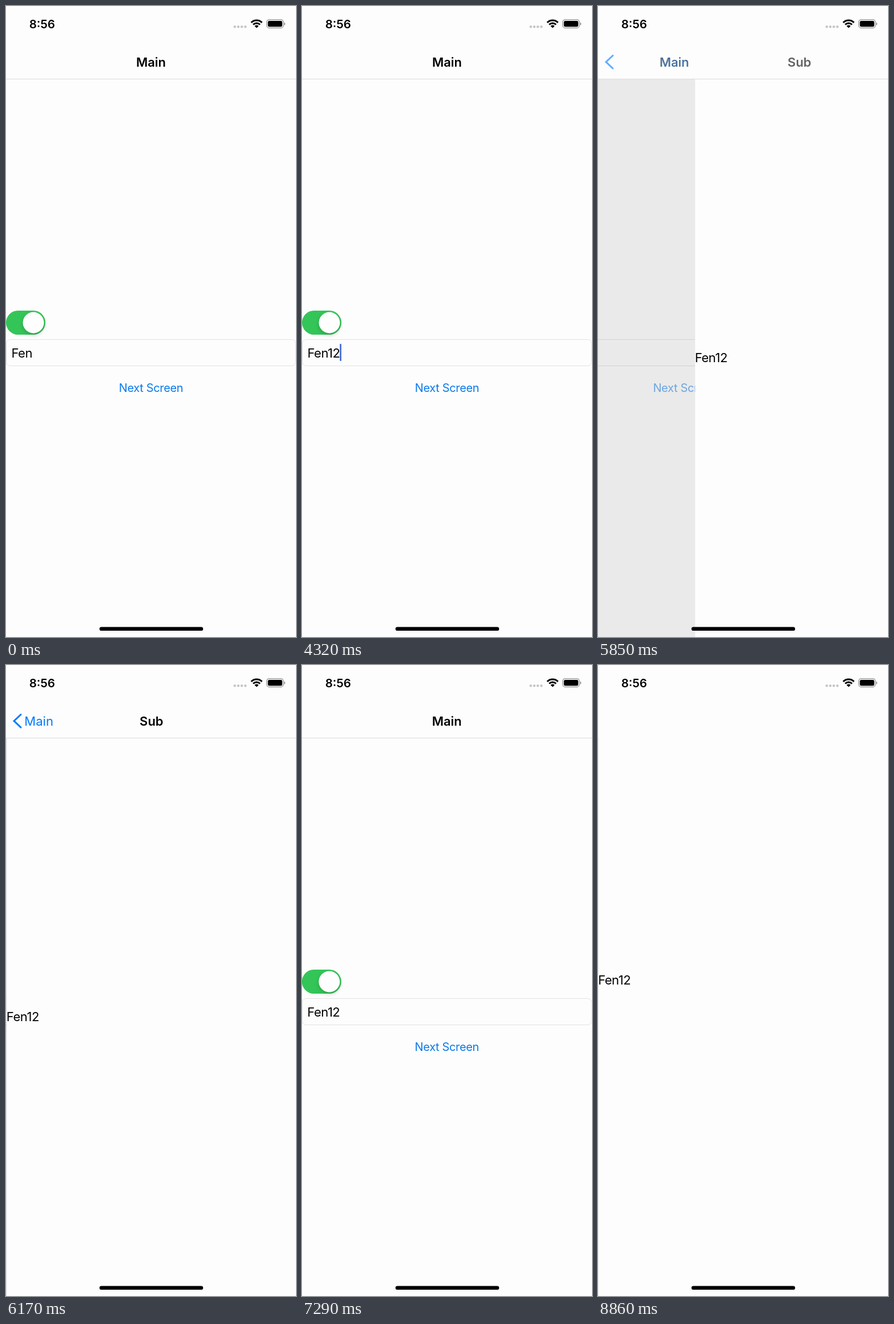
Animation, 508 px wide and 1102 px high, one loop 8.9 s. Source, as an HTML page with a canvas:

```html
<!DOCTYPE html>
<html lang="en">
<head>
<meta charset="utf-8">
<title>Navigation demo</title>
<style>
html, body { margin: 0; width: 100%; height: 100%; overflow: hidden; background: #fdfdfd; }
canvas { display: block; width: 508px; height: 1102px; }
</style>
</head>
<body>
<canvas></canvas>
<script>
const W = 508, H = 1102, LOOP = 8900;
const BG = '#fdfdfd', BLUE = '#007aff', BUTTON = '#0a7aea';
const PUSH = 5726, POP = 6799, PUSH_BARE = 8368;
const DELETES = [1440, 1550, 1670], KEYS = [3250, 3480, 3530, 3710, 3850];

const canvas = document.querySelector('canvas'), c = canvas.getContext('2d');
const dpr = window.devicePixelRatio || 1;
canvas.width = W * dpr;
canvas.height = H * dpr;
let t = 0;

const ramp = (a, b) => Math.min(1, Math.max(0, (t - a) / (b - a)));
const ease = k => k * k * (3 - 2 * k);
const count = times => times.filter(x => t >= x).length;

// Critically damped spring, 0 to 1
function spring(start) {
  const x = Math.max(0, t - start) * 0.01826;
  return 1 - (1 + x) * Math.exp(-x);
}

// Opacity of a button that is held from down to up
const press = (down, up) => 1 - 0.8 * (ramp(down, down + 60) - ramp(up, up + 250));

function text(s, x, y, size, color, { weight = 400, align = 'left', spacing = 0, alpha = 1 } = {}) {
  c.font = `${weight} ${size}px Inter, sans-serif`;
  c.letterSpacing = spacing + 'px';
  c.textAlign = align;
  c.fillStyle = color;
  c.globalAlpha = alpha;
  c.fillText(s, x, y);
  c.globalAlpha = 1;
  return c.measureText(s).width;
}

function rect(x, y, w, h, color) {
  c.fillStyle = color;
  c.fillRect(x, y, w, h);
}

function round(x, y, w, h, r, color, stroke) {
  c.beginPath();
  c.roundRect(x, y, w, h, r);
  if (stroke) {
    c.lineWidth = stroke;
    c.strokeStyle = color;
    c.stroke();
  } else {
    c.fillStyle = color;
    c.fill();
  }
}

function toggle(y) {
  const off = ease(ramp(7640, 7900));
  const grow = 9 * (ease(ramp(7520, 7620)) - ease(ramp(7640, 7860)));
  round(0, y, 69, 42, 21, '#e4e4e6');
  c.globalAlpha = 1 - off;
  round(0, y, 69, 42, 21, '#34c558');
  c.globalAlpha = 1;
  c.save();
  c.shadowColor = 'rgba(0,0,0,.18)';
  c.shadowBlur = 7 * dpr;
  c.shadowOffsetY = 3 * dpr;
  round(29.5 - 27 * off - grow * (1 - off), y + 2.5, 37 + grow, 37, 18.5, '#fefefe');
  c.restore();
}

function mainPage(p, bare) {
  const value = t < KEYS[0] ? 'Fen'.slice(0, 3 - count(DELETES)) : 'Fen12'.slice(0, count(KEYS));
  c.save();
  c.translate(-0.3 * W * p, bare ? 64 : 0);
  toggle(532);
  round(0.5, 582.5, 507, 46, 7, '#e2e2e2', 1);
  const width = text(value, 9.5, 614, 22, '#000', { spacing: -0.5 });
  if (t < PUSH) {
    c.globalAlpha = ramp(740, 790) - ramp(2410, 2600) + ramp(2780, 2920)
      - ramp(4320, 4500) + ramp(4690, 4870) - ramp(5340, 5530);
    round(9.3 + width, 590, 2.7, 30, 1, '#4169d9');
    c.globalAlpha = 1;
  }
  text('Next Screen', 254, 674, 20, value ? BUTTON : '#c0c0be', {
    align: 'center', spacing: -0.35, alpha: press(5600, 5738) * press(8200, 8380)
  });
  c.restore();
  rect(0, 0, W, H, `rgba(0,0,0,${0.11 * p})`);
}

function subPage(x, bare) {
  rect(x, 0, W, H, BG);
  text('Fen12', x - 0.5, bare ? 558 : 622, 22, '#000', { spacing: -0.5 });
}

function navBar(q, x) {
  const title = { weight: 600, align: 'center' };
  const back = q * press(6640, 6800);
  const shift = -197 * q;
  c.save();
  c.translate(x, 0);
  rect(0, 0, W, 127, BG);
  rect(0, 127, W, 1, '#dcdcdc');
  text('Main', 254 + shift, 106, 22, BLUE, { align: 'center', alpha: back });
  text('Main', 254 + shift, 106, 22, '#000', { ...title, alpha: 1 - q });
  text('Sub', 254 + 254 * (1 - q), 106, 22, '#000', { ...title, alpha: q });
  c.globalAlpha = back;
  c.strokeStyle = BLUE;
  c.lineWidth = 3;
  c.lineCap = 'round';
  c.beginPath();
  c.moveTo(26, 86.5);
  c.lineTo(14, 97.7);
  c.lineTo(26, 109);
  c.stroke();
  c.restore();
}

function statusBar() {
  text('8:56', 63.3, 38.7, 20.5, '#000', { weight: 600, align: 'center' });
  for (let i = 0; i < 4; i++) round(398.5 + 6.2 * i, 34, 4.4, 4.4, 2.2, '#c6c6c6');
  c.strokeStyle = c.fillStyle = '#000';
  c.lineCap = 'butt';
  c.lineWidth = 3;
  const up = -Math.PI / 2;
  for (const r of [13.4, 8.5]) {
    c.beginPath();
    c.arc(439, 38.5, r, up - 0.78, up + 0.78);
    c.stroke();
  }
  c.beginPath();
  c.moveTo(439, 38.5);
  c.arc(439, 38.5, 5, up - 0.78, up + 0.78);
  c.fill();
  round(456.7, 23.9, 29.2, 14.4, 4.2, '#8c8c8c', 1.2);
  round(458.7, 25.9, 25.2, 10.4, 2.4, '#000');
  round(487.3, 28.7, 1.7, 5, [0, 2, 2, 0], '#8c8c8c');
}

function draw() {
  const bare = t >= PUSH_BARE;
  const p = spring(PUSH) - spring(POP) + spring(PUSH_BARE);
  const q = spring(PUSH + 12) - spring(POP + 12);
  const x = W * (1 - p);
  c.setTransform(dpr, 0, 0, dpr, 0, 0);
  rect(0, 0, W, H, BG);
  mainPage(p, bare);
  subPage(x, bare);
  navBar(q, bare ? x - W : 0);
  statusBar();
  round(163.7, 1084.4, 181.6, 6.7, 3.35, '#000');
}

const begin = performance.now();
function tick() {
  t = (performance.now() - begin) % LOOP;
  draw();
  requestAnimationFrame(tick);
}
tick();
</script>
</body>
</html>
```
